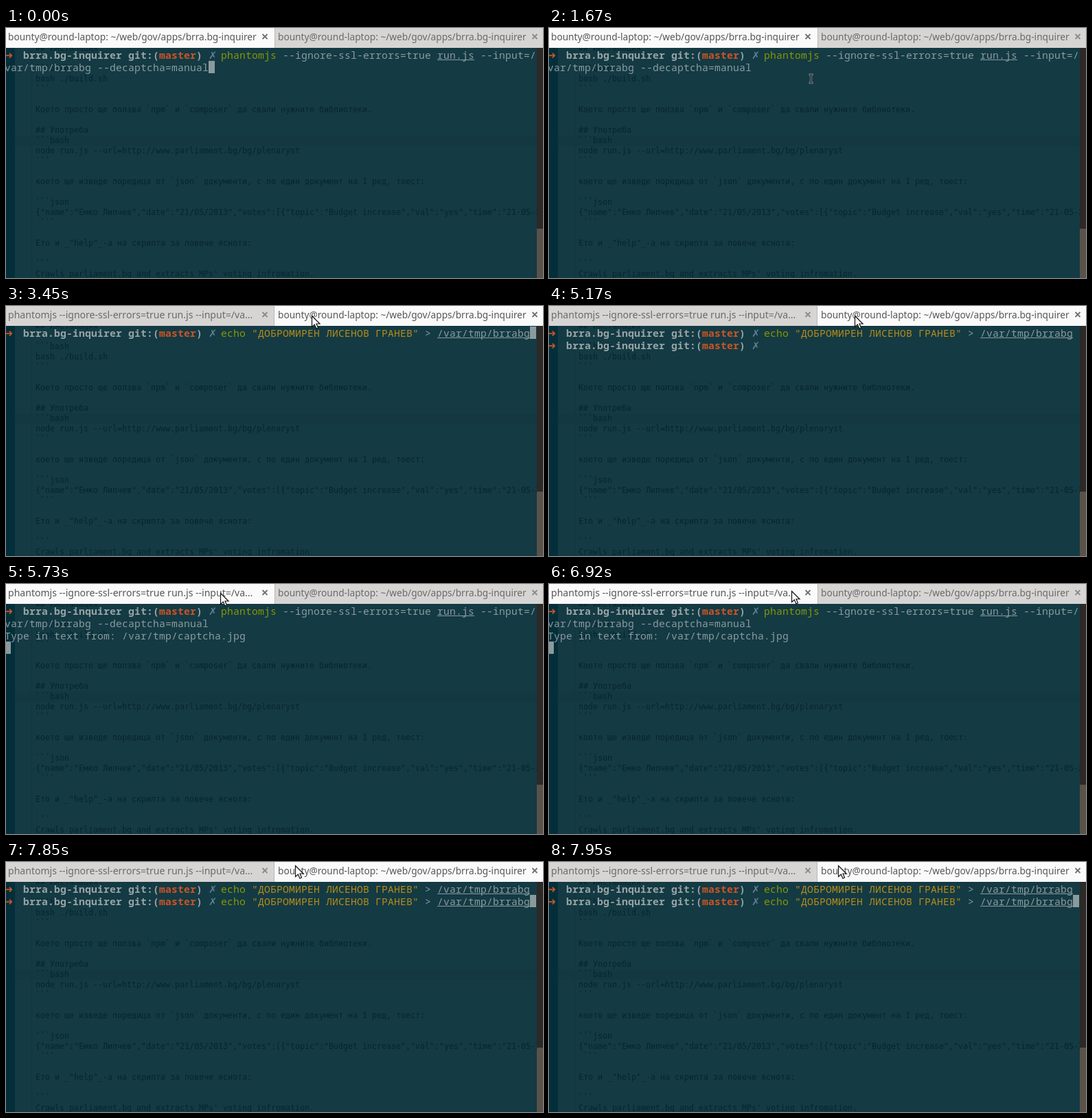
An HTML page with a canvas that plays this animation: 782 by 365 pixels, repeating every 8000 ms.

```html
<!DOCTYPE html>
<html lang="bg">
<head>
<meta charset="utf-8">
<title>Terminal session</title>
<style>
html, body { margin: 0; width: 100%; height: 100%; overflow: hidden; background: #143a44; }
canvas { display: block; }
</style>
</head>
<body>
<canvas id="stage" width="782" height="365"></canvas>
<script>
const ctx = document.getElementById('stage').getContext('2d');
const W = 782, H = 365, BAR = 29, LOOP = 8000, BLINK = 575;
const CELL = 9, LINE = 18;
const FG = '#8a9b9d';

const TERM = '14.67px "Noto Sans Mono", "DejaVu Sans Mono", monospace';
const SIGN = '14.67px "DejaVu Sans", sans-serif';
const STYLE = {
  plain: { color: FG, font: TERM },
  link: { color: FG, font: TERM, underline: true },
  command: { color: '#859900', font: TERM },
  string: { color: '#b58d18', font: TERM },
  bold: { color: '#98a5a5', font: 'bold ' + TERM },
  branch: { color: '#cb5424', font: 'bold ' + TERM },
  arrow: { color: '#cb5424', font: 'bold ' + SIGN },
  cross: { color: '#5f7f92', font: SIGN }
};

const HOST = 'bounty@round-laptop: ~/web/gov/apps/brra.bg-inquirer';
const RUNNING = 'phantomjs --ignore-ssl-errors=true run.js --input=/va...';

const PROMPT = [
  ['➜', 'arrow'], ['  brra.bg-inquirer git:(', 'bold'], ['master', 'branch'],
  [') ', 'bold'], ['✗', 'cross'], [' ', 'plain']
];
const CRAWL = [
  ['phantomjs', 'command'], [' --ignore-ssl-errors=true ', 'plain'],
  ['run.js', 'link'], [' --input=/', 'plain']
];
const ECHO = [
  ['echo', 'command'], [' ', 'plain'], ['"ДОБРОМИРЕН ЛИСЕНОВ ГРАНЕВ"', 'string'],
  [' > ', 'plain'], ['/var/tmp/brrabg', 'link']
];
const FLAGS = [['var/tmp/brrabg --decaptcha=manual', 'plain']];
const CAPTCHA = [['Type in text from: /var/tmp/captcha.jpg', 'plain']];

const typed = [[...PROMPT, ...CRAWL], FLAGS];
const echoed = [[...PROMPT, ...ECHO]];

// Each scene ends with the text cursor and restarts its blinking
const SCENES = [
  { at: -65, tab: 0, rows: typed },
  { at: 1880, tab: 0, rows: [...typed, []], busy: true },
  { at: 3445, tab: 1, rows: echoed, busy: true },
  { at: 4595, tab: 1, rows: [...echoed, PROMPT], busy: true },
  { at: 5730, tab: 0, rows: [...typed, CAPTCHA, []], busy: true },
  { at: 7125, tab: 1, rows: [...echoed, PROMPT], busy: true },
  { at: 7850, tab: 1, rows: [...echoed, ...echoed], busy: true }
];

// Each move starts where the one before ended
const MOVES = [
  { at: 180, ms: 340, x: 382, y: 74 },
  { at: 2870, ms: 210, x: 446, y: 61 },
  { at: 3080, ms: 320, x: 445, y: 14 },
  { at: 5310, ms: 260, x: 312, y: 13 },
  { at: 6780, ms: 340, x: 421, y: 5 }
];

// Editor showing through the terminal
const NOTES = `## Инсталация

\`\`\`bash
bash ./build.sh
\`\`\`

Което просто ще ползва \`npm\` и \`composer\` да свали нужните библиотеки.

## Употреба
\`\`\`bash
node run.js --url=http://www.parliament.bg/bg/plenaryst
\`\`\`

което ще изведе поредица от \`json\` документи, с по един документ на 1 ред, тоест:

\`\`\`json
{"name":"Емко Липчев","date":"21/05/2013","votes":[{"topic":"Budget increase","val":"yes","time":"21-05-2013"
 \`\`\`

Ето и _"help"_-а на скрипта за повече яснота:

\`\`\`
Crawls parliament.bg and extracts MPs' voting infromation.`.split('\n');

const latest = (list, t) => list.findLastIndex(item => item.at <= t);
const colX = col => CELL * col - 2;
const rowY = row => BAR + 1 + LINE * row;

function rect(x, y, w, h, color) {
  ctx.fillStyle = color;
  ctx.fillRect(x, y, w, h);
}

function grid(text, x, y, step) {
  [...text].forEach((ch, i) => { if (ch !== ' ') ctx.fillText(ch, x + i * step, y); });
}

function backdrop() {
  rect(0, BAR, W, H, '#143a44');
  rect(0, BAR, 13, H, '#042f3a');
  rect(37, BAR, 1, H, '#11353f');
  rect(13, 157, 760, 15, '#133842');
  ctx.font = '11.7px "DejaVu Sans Mono", monospace';
  ctx.fillStyle = '#06262f';
  NOTES.forEach((text, i) => grid(text, 43, 33 + 15 * i, 7));
}

// Draws styled spans one after another, returns the column reached
function write(spans, row) {
  let col = 0;
  for (const [text, name] of spans) {
    const { color, font, underline } = STYLE[name];
    ctx.font = font;
    ctx.fillStyle = color;
    grid(text, colX(col), rowY(row) + 15, CELL);
    if (underline) ctx.fillRect(colX(col), rowY(row) + 16, text.length * CELL, 1);
    col += text.length;
  }
  return col;
}

function terminal({ at, rows }, t) {
  let col = 0;
  rows.forEach((spans, row) => { col = write(spans, row); });
  const lit = Math.floor((t - at) / BLINK) % 2 === 0;
  if (lit) rect(colX(col), rowY(rows.length - 1), CELL, LINE, FG);
}

function scrollbar(top) {
  rect(773, BAR, 9, H, '#2d2926');
  rect(773, top, 9, H, '#5b524a');
}

function tab(x, label, size, active) {
  rect(x, 0, 391, BAR, active ? '#fafafa' : '#d6d5d4');
  ctx.font = size + 'px "Noto Sans", sans-serif';
  ctx.fillStyle = active ? '#575757' : '#6a6a6a';
  ctx.fillText(label, x + (x ? 5 : 3), 18);
  const cx = x ? 770 : 377;
  ctx.strokeStyle = active ? '#707070' : '#8a8a8a';
  ctx.lineWidth = 1.8;
  ctx.beginPath();
  for (const s of [-3.5, 3.5]) {
    ctx.moveTo(cx - s, 9);
    ctx.lineTo(cx + s, 16);
  }
  ctx.stroke();
}

function ibeam(x, y) {
  for (const [color, width] of [['#b9c4c6', 2.4], ['#000', 1.2]]) {
    ctx.strokeStyle = color;
    ctx.lineWidth = width;
    ctx.beginPath();
    for (const end of [y - 6, y + 6]) {
      ctx.moveTo(x - 3, end);
      ctx.lineTo(x + 3, end);
    }
    ctx.moveTo(x, y - 6);
    ctx.lineTo(x, y + 6);
    ctx.stroke();
  }
}

function arrow(x, y) {
  const outline = new Path2D('M0 0V16L3.8 12.5L6.4 18.5L9 17.3L6.5 11.5H11.5Z');
  ctx.save();
  ctx.translate(x + 0.5, y + 0.5);
  ctx.fillStyle = '#fff';
  ctx.fill(outline);
  ctx.strokeStyle = '#111';
  ctx.lineWidth = 1.2;
  ctx.stroke(outline);
  ctx.restore();
}

function pointer(t) {
  const i = latest(MOVES, t);
  const typing = i === 0 && t >= SCENES[1].at;
  if (i < 0 || typing) return;
  const to = MOVES[i], from = MOVES[i - 1] || { x: 790, y: 372 };
  const k = Math.min(1, (t - to.at) / to.ms);
  const ease = k * k * (3 - 2 * k);
  const x = Math.round(from.x + (to.x - from.x) * ease);
  const y = Math.round(from.y + (to.y - from.y) * ease);
  if (y < BAR) arrow(x, y);
  else ibeam(x - 0.5, y);
}

function draw(t) {
  const scene = SCENES[latest(SCENES, t)];
  const second = scene.tab === 1;
  backdrop();
  terminal(scene, t);
  scrollbar(second ? 271 : 293);
  tab(0, scene.busy ? RUNNING : HOST, scene.busy ? 14.05 : 13.67, !second);
  tab(391, HOST, 13.67, second);
  rect(second ? 390 : 391, 0, 1, BAR, '#b9b8b6');
  pointer(t);
}

function tick(now) {
  draw(now % LOOP);
  requestAnimationFrame(tick);
}
requestAnimationFrame(tick);
</script>
</body>
</html>
```
